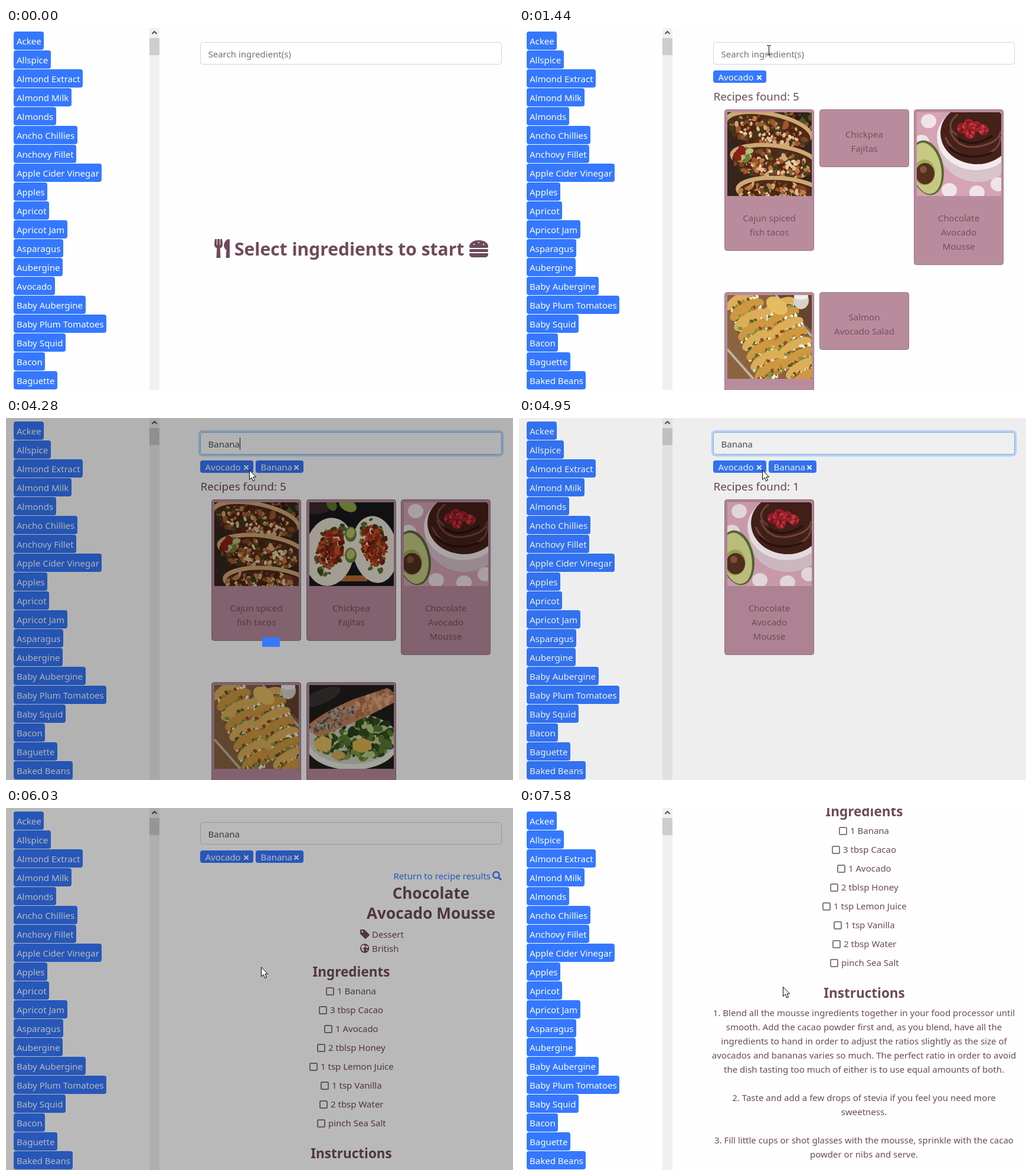
Write an HTML page with a canvas that moves like this. It is 859x614 px and loops after 7650 ms.

```html
<!DOCTYPE html>
<html lang="en">
<head>
<meta charset="utf-8">
<title>Recipe finder</title>
<style>
  html, body { margin: 0; width: 100%; height: 100%; overflow: hidden; background: #fff; }
  canvas { display: block; }
</style>
</head>
<body>
<canvas id="stage" width="859" height="614"></canvas>
<script>
const LOOP = 7650;
const BLUE = '#3578ff', PLUM = '#6d4a5a', INK = '#495057';
const FONT = '"Noto Sans", "Open Sans", sans-serif';
const stage = document.getElementById('stage').getContext('2d');
let ctx = stage;

const clamp = v => Math.max(0, Math.min(1, v));
const ramp = (t, from, to) => clamp((t - from) / (to - from));
const within = (t, from, to) => t >= from && t < to;

// ---- drawing helpers ----
function text(str, x, y, { size = 15, color = PLUM, bold = false, align = 'left' } = {}) {
  ctx.font = `${bold ? 700 : 400} ${size}px ${FONT}`;
  ctx.textAlign = align;
  ctx.fillStyle = color;
  ctx.fillText(str, x, y);
  return ctx.measureText(str).width;
}
function widthOf(str, size = 15) {
  ctx.font = `400 ${size}px ${FONT}`;
  return ctx.measureText(str).width;
}
function box(x, y, w, h, r, fill, stroke, lineWidth = 1) {
  ctx.beginPath();
  ctx.roundRect(x, y, w, h, r);
  if (fill) { ctx.fillStyle = fill; ctx.fill(); }
  if (stroke) { ctx.strokeStyle = stroke; ctx.lineWidth = lineWidth; ctx.stroke(); }
}
function blob(x, y, rx, ry, color, turn = 0) {
  ctx.beginPath();
  ctx.ellipse(x, y, rx, ry, turn, 0, 7);
  ctx.fillStyle = color;
  ctx.fill();
}
function line(d, color, width) {
  ctx.strokeStyle = color;
  ctx.lineWidth = width;
  ctx.stroke(new Path2D(d));
}
function shape(d, x, y, fill, stroke) {
  ctx.save();
  ctx.translate(x, y);
  const path = new Path2D(d);
  ctx.fillStyle = fill;
  ctx.fill(path);
  if (stroke) { ctx.strokeStyle = stroke; ctx.lineWidth = 1; ctx.stroke(path); }
  ctx.restore();
}

// ---- food pictures, 143 x 142 each ----
function randomFrom(seed) {
  return () => (seed = (seed * 16807) % 2147483647) / 2147483647;
}
function specks(count, seed, cx, cy, rx, ry, size, colors, turn = 0) {
  const rnd = randomFrom(seed);
  for (let i = 0; i < count; i++) {
    const a = rnd() * 6.283, d = Math.sqrt(rnd());
    const u = Math.cos(a) * d * rx, v = Math.sin(a) * d * ry;
    const x = cx + u * Math.cos(turn) - v * Math.sin(turn);
    const y = cy + u * Math.sin(turn) + v * Math.cos(turn);
    const s = size * (0.5 + rnd());
    blob(x, y, s, s * 0.65, colors[i % colors.length], rnd() * 3);
  }
}
function picture(background, paint) {
  const canvas = document.createElement('canvas');
  canvas.width = 143;
  canvas.height = 142;
  ctx = canvas.getContext('2d');
  ctx.fillStyle = background;
  ctx.fillRect(0, 0, 143, 142);
  paint();
  ctx = stage;
  return canvas;
}
const FILLING = ['#4c2413', '#a0582c', '#5e2b19', '#bd7b45', '#39401f', '#7d4526', '#d2a676'];

const tacos = picture('#35251d', () => {
  specks(70, 5, 115, 15, 45, 30, 5, ['#4b5727', '#2a1b15', '#6f2d1a', '#8a5a35']);
  [[62, 30, 0.2], [72, 84, 0.12], [82, 139, 0.08]].forEach(([x, y, turn], i) => {
    blob(x + 8, y - 4, 76, 27, '#cfa873', turn);
    blob(x + 8, y + 2, 72, 26, '#4e2a18', turn);
    specks(190, 31 + i, x + 4, y + 4, 68, 23, 4.5, FILLING, turn);
    specks(26, 51 + i, x + 4, y + 4, 55, 15, 3, ['#e3bd8e', '#e9cfa5'], turn);
  });
  specks(14, 9, 30, 72, 14, 10, 6, ['#8d1f18', '#6a8034', '#b5bd76']);
});

const wraps = picture('#19181c', () => {
  ctx.fillStyle = '#b86b2c';
  ctx.fillRect(50, 124, 48, 10);
  blob(12, 8, 24, 12, '#3a2a29');
  blob(65, 5, 16, 10, '#94a746', 0.5);
  blob(38, 4, 8, 11, '#60782f', -0.5);
  blob(34, 84, 42, 58, '#e6e0d2', 0.15);
  blob(111, 80, 38, 57, '#e9e4d7', -0.15);
  [[36, 78, 0.25], [110, 74, -0.2]].forEach(([x, y, turn], i) => {
    specks(50, 70 + i, x, y, 22, 48, 5, ['#5d7030', '#88923e', '#3c4e23'], turn);
    specks(150, 80 + i, x, y, 21, 34, 3.6, ['#a5321b', '#c74e25', '#70200f', '#8b2a17'], turn);
  });
  [54, 90].forEach(y => {
    blob(70, y, 10, 13, '#6b8034');
    blob(70, y - 2, 7, 9, '#b3bd70', 0.3);
  });
});

const mousse = picture('#d5a3b5', () => {
  [[20, 15], [8, 50], [55, 132], [102, 136], [138, 122]].forEach(([x, y]) => blob(x, y, 13, 12, '#f0e3e9'));
  blob(101, 62, 64, 56, '#d9c3cc', 0.1);
  blob(99, 44, 65, 54, '#f3e9ec', 0.1);
  blob(100, 37, 60, 51, '#44211a', 0.1);
  line('M48 42q18 38 56 32t38-34M56 30q12 34 48 28t38-26M70 3q-25 20-2 36', '#75463a', 3);
  line('M54 58q28 28 74 10M70 44q25 18 58-4', '#2b130f', 4);
  [[77, 27], [90, 36], [101, 24], [113, 30], [88, 20]].forEach(([x, y], i) => {
    blob(x, y, 9, 9, '#a5202c');
    specks(16, 40 + i, x, y, 7, 7, 2.5, ['#c93f42', '#821722']);
  });
  blob(17, 94, 28, 47, '#586a30', -0.2);
  blob(16, 95, 25, 44, '#c6c983', -0.2);
  blob(13, 102, 18, 22, '#a1a95a');
  blob(14, 104, 16, 18, '#55301f');
  blob(11, 97, 6, 6, '#845341');
});

const tray = picture('#8a6440', () => {
  shape('M78 0H143V60z', 0, 0, '#64452f');
  line('M0 92L44 142M82 0L143 70', '#bdb6a4', 4);
  [[26, 8], [86, 22]].forEach(([left, top], column) => {
    for (let i = 0; i < 8; i++) {
      const x = left + i * 7, y = top + i * 17;
      blob(x, y, 32, 13, i % 2 ? '#cf9840' : '#dcae58', -0.5);
      specks(34, 11 + i + column * 9, x + 2, y + 7, 29, 6, 3,
        ['#48602a', '#8c4a23', '#f0ead8', '#7c9440', '#b98238'], -0.5);
    }
  });
  blob(84, 18, 20, 13, '#e3bd60', 0.6);
  blob(125, 9, 13, 15, '#d8d2c9');
  blob(125, 2, 12, 6, '#f2eeea');
});

const salmon = picture('#211e1d', () => {
  blob(20, 20, 35, 12, '#3c3431', -0.4);
  blob(72, 96, 80, 48, '#e9e7df');
  blob(72, 91, 74, 43, '#cfd0c3');
  specks(190, 17, 76, 89, 65, 37, 7, ['#365023', '#587b32', '#29401d', '#7f9b47', '#bdc985']);
  shape('M0 66Q25 45 75 24L132 5Q146 10 143 30L100 52 18 88Q3 86 0 66z', 0, 0, '#c7845c');
  specks(80, 23, 104, 32, 40, 14, 4, ['#d8996f', '#b56e48', '#e0ab84'], -0.45);
  specks(150, 28, 40, 58, 44, 13, 2.5, ['#aaa49b', '#5a544f', '#8b7b6c', '#c0a58a'], -0.5);
  shape('M8 96l14-11 16 8-1 16-16 4-13-8z', 0, 0, '#e5bd62');
  shape('M73 97l16-8 15 6 2 14-18 6-14-6z', 0, 0, '#dfb452');
  blob(49, 119, 12, 7, '#d4ac56');
});

// ---- content ----
const PANTRY = ['Ackee', 'Allspice', 'Almond Extract', 'Almond Milk', 'Almonds', 'Ancho Chillies',
  'Anchovy Fillet', 'Apple Cider Vinegar', 'Apples', 'Apricot', 'Apricot Jam', 'Asparagus',
  'Aubergine', 'Avocado', 'Baby Aubergine', 'Baby Plum Tomatoes', 'Baby Squid', 'Bacon',
  'Baguette', 'Baked Beans'];
const MOUSSE = { title: ['Chocolate', 'Avocado', 'Mousse'], image: mousse, loaded: 1200 };
const RECIPES = [
  { title: ['Cajun spiced', 'fish tacos'], image: tacos, loaded: 1130 },
  { title: ['Chickpea', 'Fajitas'], image: wraps, loaded: 1500 },
  MOUSSE,
  { title: ['Fish Tacos'], image: tray, loaded: 1270 },
  { title: ['Salmon', 'Avocado Salad'], image: salmon, loaded: 1640 }
];
const INGREDIENTS = ['1 Banana', '3 tbsp Cacao', '1 Avocado', '2 tblsp Honey', '1 tsp Lemon Juice',
  '1 tsp Vanilla', '2 tbsp Water', 'pinch Sea Salt'];
const STEPS = [
  '1. Blend all the mousse ingredients together in your food processor until',
  'smooth. Add the cacao powder first and, as you blend, have all the',
  'ingredients to hand in order to adjust the ratios slightly as the size of',
  'avocados and bananas varies so much. The perfect ratio in order to avoid',
  'the dish tasting too much of either is to use equal amounts of both.',
  '',
  '2. Taste and add a few drops of stevia if you feel you need more',
  'sweetness.',
  '',
  '3. Fill little cups or shot glasses with the mousse, sprinkle with the cacao',
  'powder or nibs and serve.'
];

// ---- timeline ----
const PICK_AVOCADO = 130, PICK_BANANA = 3760, FOCUS = 1780, BLUR = 5620;
const SUGGEST = 3000, VIDEO = 6690;
const LOADS = [
  { start: 140, done: 960 },
  { start: 3850, done: 4840 },
  { start: 5640, done: 6020 }
];
const CARETS = [[1780, 2250], [2400, 2750], [3330, 3730], [3900, 4430]];
// time, x, y, kind
const POINTER = [
  [130, 52, 440, 'arrow'], [900, 52, 440, 'arrow'], [1330, 420, 60, 'arrow'], [1400, 423.5, 37, 'beam'],
  [3730, 423.5, 37, 'beam'], [3800, 412.5, 88.5, 'arrow'], [5339, 412.5, 88.5, 'arrow'],
  [5340, 399.5, 138, 'beam'], [5410, 408, 180, 'arrow'], [5620, 432.5, 270, 'arrow'],
  [6620, 432.5, 270, 'arrow'], [6700, 432.5, 274.5, 'arrow'], [6840, 432.5, 274.5, 'arrow'],
  [6900, 433.5, 278.5, 'arrow'], [7309, 433.5, 278.5, 'arrow'], [7310, 433.5, 279.5, 'arrow'],
  [7509, 433.5, 279.5, 'arrow'], [7510, 441.5, 292.5, 'arrow'], [7579, 441.5, 292.5, 'arrow'],
  [7580, 447.5, 303.5, 'arrow']
];

// ---- parts of the page ----
function drawPantry(t) {
  PANTRY.filter(name => t < PICK_AVOCADO || name !== 'Avocado').forEach((name, i) => {
    const y = 6 + i * 32;
    box(13, y, Math.round(widthOf(name) + 9.5), 31, 4, BLUE);
    text(name, 18, y + 22, { color: '#fff' });
  });
  ctx.fillStyle = '#f0f0f0';
  ctx.fillRect(243, 0, 17, 614);
  ctx.fillStyle = '#cdcdcd';
  ctx.fillRect(243, 17, 17, 29);
  line('M247.500 10l4-4 4 4', '#505050', 2);
}

function drawSearch(t) {
  const focus = ramp(t, FOCUS - 40, 1920) * (1 - ramp(t, BLUR, BLUR + 150));
  if (focus) box(327.4, 22.4, 514.2, 41.2, 5.6, null, `rgba(0,123,255,${0.25 * focus})`, 3.2);
  box(329.5, 24.5, 510, 37, 4, '#fff', focus > 0.5 ? '#80bdff' : '#ced4da');
  const typed = t >= PICK_BANANA ? 'Banana'
    : t >= 2400 ? 'banan'.slice(0, Math.floor((t - 2400) / 100) + 1) : '';
  if (typed) text(typed, 342.5, 50, { color: INK });
  else text('Search ingredient(s)', 342.5, 50, { color: '#6c757d' });
  if (CARETS.some(([on, off]) => within(t, on, off))) {
    ctx.fillStyle = '#222';
    ctx.fillRect(Math.round(342 + (typed ? widthOf(typed) : 0)), 33, 1, 21);
  }
}

function drawChip(name, x, w) {
  box(x, 72, w, 21, 4, BLUE);
  text(name, x + 8.5, 89, { color: '#fff' });
  line(`M${x + w - 15.5} 80.500l7 7m0-7l-7 7`, '#fff', 2.2);
}

function drawSuggestion() {
  box(329.5, 65.5, 159, 48, 4, '#fff', '#d0d0d0');
  ctx.fillStyle = '#007bff';
  ctx.fillRect(330, 73, 158, 32);
  const w = text('Banan', 354, 96, { color: '#fff', bold: true });
  text('a', 354 + w, 96, { color: '#fff' });
}

function drawWelcome() {
  shape('M1 0h3v10h1V0h4v10h1V0h3q1 6 1 9 0 5-4.300 6.500l.8 15Q10.500 32 9 32H5q-1.500 0-1.500-1.500l.8-15Q0 14 0 9 0 6 1 0z'
    + 'M26 1.500v29q0 1.500-1.500 1.500H21q-1.500 0-1.500-1.500l1-11.700C11 11 19.500 0 24.500 0q1.500 0 1.500 1.500z', 353, 358, PLUM);
  text('Select ingredients to start', 387, 386, { size: 30, bold: true });
  shape('M0 11C0 4 7 0 16 0s16 4 16 11q0 2-2 2H2q-2 0-2-2z', 785, 360, PLUM);
  box(785, 375, 32, 5, 2.5, PLUM);
  box(785, 382, 32, 7, [1, 1, 5, 5], PLUM);
  [[793, 367], [801, 364], [809, 367]].forEach(([x, y]) => blob(x, y, 1.2, 1, '#fff'));
}

function drawResults(recipes, t) {
  text('Recipes found: ' + recipes.length, 329.5, 123, { size: 18.75 });
  recipes.forEach(({ title, image, loaded }, i) => {
    const x = Math.round(348 + (i % 3) * 160.5), y = i < 3 ? 138 : 448;
    const imageHeight = t >= loaded ? 142 : 0;
    box(x + 0.5, y + 0.5, 151, 49 + title.length * 24 + imageHeight, 4, '#b98c9d', '#9b7483');
    if (imageHeight) ctx.drawImage(image, x + 5, y + 5);
    title.forEach((row, n) => text(row, x + 76, y + 48 + imageHeight + n * 24,
      { align: 'center', color: '#74515e' }));
  });
}

function drawRecipe(t) {
  text('Return to recipe results', 656.5, 121, { color: BLUE });
  ctx.beginPath();
  ctx.arc(830.5, 113.5, 5.2, 0, 7);
  ctx.strokeStyle = BLUE;
  ctx.lineWidth = 2.4;
  ctx.stroke();
  line('M834 117l5 5', BLUE, 3);
  if (t >= VIDEO) {
    ctx.fillStyle = '#000';
    ctx.fillRect(330, 126, 249, 122);
  }
  const heading = (str, x, y, size) => text(str, x, y, { size, bold: true, align: 'center' });
  heading('Chocolate', 720, 154, 26.25);
  heading('Avocado Mousse', 720, 188, 26.25);
  shape('M0 1.500Q0 0 1.500 0H7l8.500 8.200q1 1 0 2L10 15.500q-1 1-2 0L0 7.500z', 600, 206, PLUM);
  blob(603.7, 209.7, 1.5, 1.5, '#fff');
  text('Dessert', 620, 220);
  blob(607.7, 238, 7.7, 7.7, PLUM);
  shape('M2 4l4-2 3 2-2 3-3 1 3 2-1 4-3-3-1-3zM11 3l3 3-2 2-3-2zM10 10h3l-2 3z', 600, 230, '#fff');
  text('British', 620, 244);

  heading('Ingredients', 585, 286, 22.5);
  INGREDIENTS.forEach((item, i) => {
    const x = Math.round(585 - (widthOf(item) + 19) / 2), y = 304 + i * 32;
    box(x + 1, y + 1, 12, 12, 1.5, '#fff', '#85788a', 2);
    text(item, x + 19, y + 12);
  });
  heading('Instructions', 585, 594, 22.5);
  STEPS.forEach((row, i) => text(row, 584.5, 625 + i * 24, { align: 'center' }));
}

function drawLoading(t) {
  LOADS.forEach(({ start, done }) => {
    const alpha = 0.3 * ramp(t, start, start + 200) * (1 - ramp(t, done, done + 140));
    ctx.fillStyle = `rgba(0,0,0,${alpha})`;
    ctx.fillRect(0, 0, 859, 614);
    if (!within(t, start + 193, done)) return;
    // a square flipping in turn about each axis
    const turns = (t - start - 193) / 750;
    const eased = 1 - (1 - turns % 1) ** 3;
    const squash = 30 * Math.abs(Math.cos(Math.PI * eased));
    const [w, h] = Math.floor(turns) % 2 ? [squash, 30] : [30, squash];
    ctx.fillStyle = BLUE;
    ctx.fillRect(449 - w / 2, 380 - h / 2, w, h);
  });
}

function drawPointer(t) {
  const next = POINTER.findIndex(key => key[0] > t);
  if (next === 0) return;
  const a = POINTER[(next < 0 ? POINTER.length : next) - 1], b = next < 0 ? a : POINTER[next];
  const k = a === b ? 0 : ramp(t, a[0], b[0]);
  const x = a[1] + (b[1] - a[1]) * k, y = a[2] + (b[2] - a[2]) * k;
  if (a[3] === 'beam') {
    line(`M${x - 3.5} ${y - 7.5}h3m1 0h3M${x} ${y - 7}v15M${x - 3.5} ${y + 8.5}h3m1 0h3`, '#000', 1);
  } else {
    shape('M0 0v16l3.700-3.500 2.500 6 2.700-1.200-2.500-5.800H11z', x, y, '#fff', '#000');
  }
}

function draw(t) {
  ctx.fillStyle = '#fefefe';
  ctx.fillRect(0, 0, 859, 614);
  drawPantry(t);

  const s = ramp(t, 6840, 7100);
  ctx.save();
  ctx.translate(0, -Math.round(272 * s * s * (3 - 2 * s)));
  drawSearch(t);
  if (t >= PICK_AVOCADO) drawChip('Avocado', 329, 90);
  if (t >= PICK_BANANA) drawChip('Banana', 423, 81);
  if (t < LOADS[0].done) drawWelcome();
  else if (t < LOADS[1].done) drawResults(RECIPES, t);
  else if (t < LOADS[2].done) drawResults([MOUSSE], t);
  else drawRecipe(t);
  if (within(t, SUGGEST, PICK_BANANA)) drawSuggestion();
  ctx.restore();

  drawLoading(t);
  drawPointer(t);
}

const begin = performance.now();
function tick() {
  draw((performance.now() - begin) % LOOP);
  requestAnimationFrame(tick);
}
tick();
</script>
</body>
</html>
```
